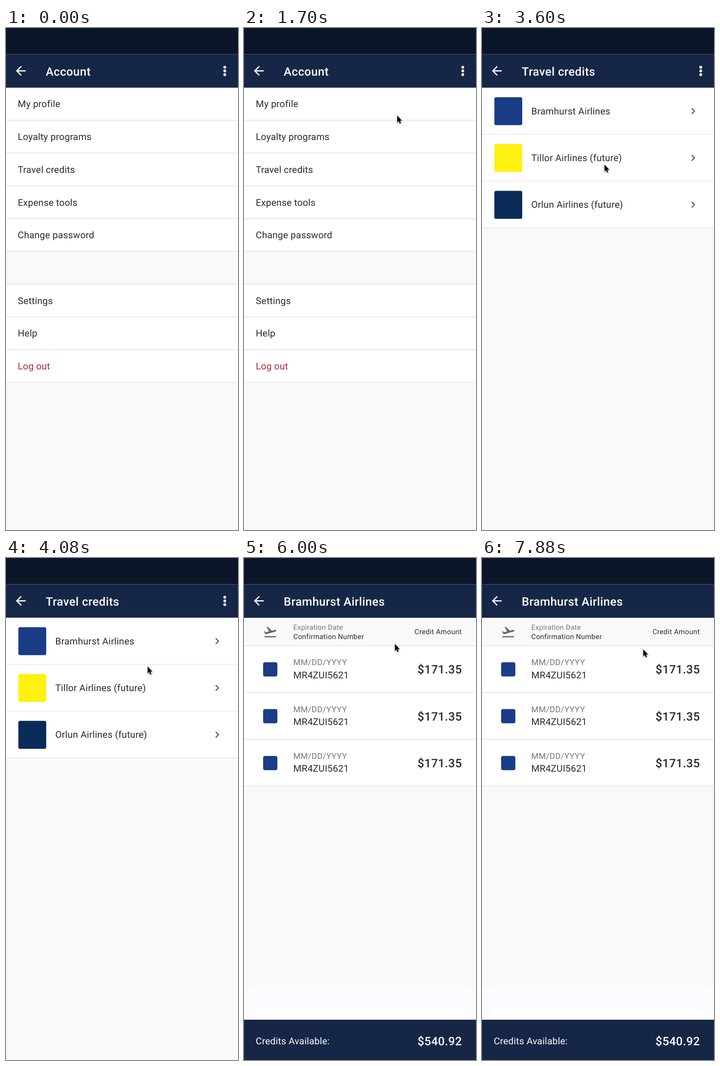
These frames come from a looping animation (473x1022 px, 8 s). An HTML page:

```html
<!DOCTYPE html>
<html lang="en">
<head>
<meta charset="utf-8">
<title>Travel credits</title>
<style>
  html, body { margin: 0; width: 100%; height: 100%; overflow: hidden; background: #f9f9f9; }
  svg { display: block; width: 473px; height: 1022px; }
  text { font: 400 19.07px Roboto, sans-serif; letter-spacing: .25px; fill: #2a2a2a; text-rendering: geometricPrecision; }
  .title, .amount { font-size: 23.84px; font-weight: 500; letter-spacing: .42px; }
  .amount { letter-spacing: .36px; }
  .small { font-size: 14.3px; letter-spacing: .33px; }
  .date { font-size: 16.7px; letter-spacing: .43px; }
  .muted { fill: #747474; }
  .light { fill: #fff; }
  .danger { fill: #ad2a31; }
  .end { text-anchor: end; }
  #cursor { filter: drop-shadow(0 1.5px 1.2px rgba(0, 0, 0, .4)); }
</style>
</head>
<body>
<svg id="stage" viewBox="0 0 473 1022"></svg>
<script>
const LOOP = 8000;
const NAVY = '#162646', GREY = '#f9f9f9';
const TOP = 121.7, COLUMN = 100.5, RIGHT = 444.3;
const ARROW = 'M20 11H7.83l5.59-5.59L12 4l-8 8 8 8 1.41-1.41L7.83 13H20z';
const PLANE = 'M2.5 19h19v2h-19zm19.57-9.36c-.21-.8-1.04-1.28-1.84-1.06L14.92 10l-6.9-6.43-1.93.51 ' +
  '4.14 7.17-4.97 1.33-1.97-1.54-1.45.39 1.82 3.16.77 1.33 1.6-.43 5.31-1.42 4.35-1.16L21 11.49c.81-.23 1.28-1.05 1.07-1.85z';

const rect = (x, y, w, h, fill, r = 0) =>
  `<rect x="${x}" y="${y}" width="${w}" height="${h}" rx="${r}" fill="${fill}"/>`;
const text = (x, y, label, style = '') => `<text x="${x}" y="${y}" class="${style}">${label}</text>`;
const line = y => rect(0, y - .6, 473, 1.2, '#dedede');
const icon = (path, x, y, scale, fill) =>
  `<path d="${path}" fill="${fill}" transform="translate(${x} ${y}) scale(${scale})"/>`;
const repeat = (items, draw) => items.map(draw).join('');

const header = (title, menu) =>
  rect(0, 0, 473, 1022, GREY) + rect(0, 0, 473, 53.5, '#0b1729') + rect(0, 53.5, 473, TOP - 53.5, NAVY) +
  icon(ARROW, 15.3, 72.4, 1.24, '#fff') + text(81, 96.6, title, 'title light') +
  (menu ? repeat([79.9, 87.4, 94.9], y => `<circle cx="446" cy="${y}" r="2.8" fill="#fff"/>`) : '');

function accountPage() {
  const labels = ['My profile', 'Loyalty programs', 'Travel credits', 'Expense tools', 'Change password',
    '', 'Settings', 'Help', 'Log out'];
  return header('Account', true) + repeat(labels, (label, i) => {
    const y = TOP + i * 66.7;
    return (label ? rect(0, y, 473, 66.7, '#fff') : '') +
      text(24, y + 39.7, label, label === 'Log out' ? 'danger' : '');
  }) + repeat(labels, (_, i) => line(187.9 + i * 66.72));
}

function creditsPage() {
  const airlines = [['Bramhurst Airlines', '#1b3c87'], ['Tillor Airlines (future)', '#fff110'],
    ['Orlun Airlines (future)', '#0a2a57']];
  return header('Travel credits', true) + repeat(airlines, ([name, color], i) => {
    const y = TOP + i * 95.3;
    return rect(0, y, 473, 95.3, '#fff') + rect(25.2, y + 19.3, 56.8, 56.8, color, 3.5) +
      text(COLUMN, y + 54.1, name) + line(y + 95) +
      `<path d="M427.6 ${y + 41.9}l5.6 5.6-5.6 5.6" fill="none" stroke="#686868" stroke-width="2.5"/>`;
  });
}

function airlinePage() {
  return header('Bramhurst Airlines', false) + icon(PLANE, 38.6, 135.6, 1.23, '#686868') +
    text(COLUMN, 146, 'Expiration Date', 'small muted') + text(COLUMN, 165, 'Confirmation Number', 'small') +
    text(RIGHT - .4, 155.2, 'Credit Amount', 'small end') +
    repeat([178.6, 273.9, 369.2], y =>
      rect(0, y, 473, 95.3, '#fff') + rect(39, y + 33.7, 29, 29, '#1b3c87', 4) +
      text(COLUMN, y + 39.8, 'MM/DD/YYYY', 'date muted') + text(COLUMN, y + 66.2, 'MR4ZUI5621') +
      text(RIGHT, y + 56.6, '$171.35', 'amount end')) +
    repeat([178.6, 273.7, 369, 464.4], line) +
    rect(-64, 869, 601, 240, '#fcfbff', 104) + rect(13, 914, 447, 100, '#fff', 36) +
    rect(0, 940, 473, 82, NAVY) + text(24, 989.5, 'Credits Available:', 'light') +
    text(RIGHT, 991.6, '$540.92', 'amount end light');
}

const stage = document.getElementById('stage');
stage.innerHTML = `<g>${accountPage()}</g><g id="credits">${creditsPage()}</g><g id="airline">${airlinePage()}</g>` +
  `<path id="cursor" d="M.7 1V15.2L3.9 12.4 6.1 17.3 8.4 16.3 6.3 11.5H10.6Z" fill="#000"
    stroke="#fff" stroke-width="1.6" paint-order="stroke"/>`;
const [credits, airline, cursor] = ['credits', 'airline', 'cursor'].map(id => document.getElementById(id));

// Pointer path: time, x, y
const path = [[1040, 474, 118], [1400, 400, 130], [1700, 312, 177], [1840, 262, 251], [2100, 249, 277],
  [3600, 249, 277], [4080, 288, 220], [4380, 307, 174], [6000, 307, 174], [6660, 328, 185], [LOOP, 328, 185]];

const slope = (i, axis) => (path[i + 1][axis] - path[i][axis]) / (path[i + 1][0] - path[i][0]);

// Tangent that keeps the curve monotone, so rests stay still
function tangent(i, axis) {
  if (i === 0) return slope(0, axis);
  if (i === path.length - 1) return 0;
  const a = slope(i - 1, axis), b = slope(i, axis);
  return a * b > 0 ? 2 * a * b / (a + b) : 0;
}

function pointer(t, axis) {
  let i = 0;
  while (i < path.length - 2 && t >= path[i + 1][0]) i++;
  const span = path[i + 1][0] - path[i][0], u = (t - path[i][0]) / span, v = 1 - u;
  return v * v * (1 + 2 * u) * path[i][axis] + u * u * (3 - 2 * u) * path[i + 1][axis] +
    span * u * v * (v * tangent(i, axis) - u * tangent(i + 1, axis));
}

function fade(t, start, end) {
  const u = Math.min(1, Math.max(0, (t - start) / (end - start)));
  return 1 - (1 - u) ** 2;
}

function render() {
  const t = performance.now() % LOOP;
  credits.setAttribute('opacity', fade(t, 2730, 3040));
  airline.setAttribute('opacity', fade(t, 5230, 5470));
  cursor.setAttribute('visibility', t < path[0][0] ? 'hidden' : 'visible');
  if (t >= path[0][0]) cursor.setAttribute('transform', `translate(${pointer(t, 1)} ${pointer(t, 2)})`);
  requestAnimationFrame(render);
}
render();
</script>
</body>
</html>
```
